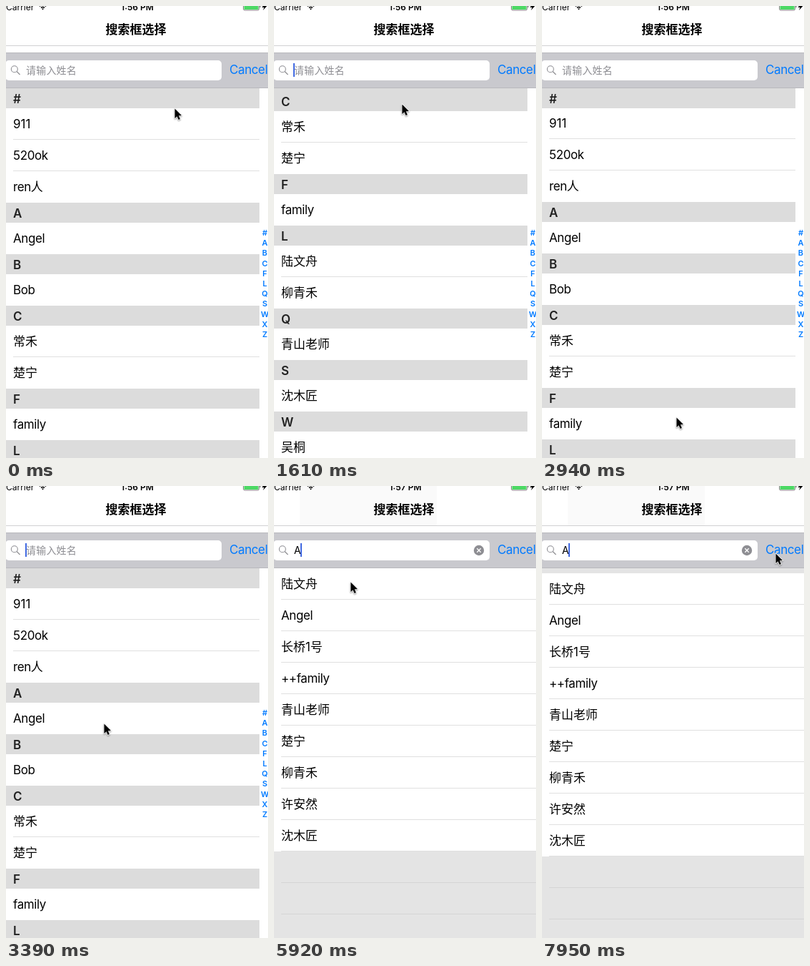
These frames come from a looping animation (367x632 px, 8 s). An HTML page with a canvas:

```html
<!DOCTYPE html>
<html lang="zh">
<head>
<meta charset="utf-8">
<style>
html, body { margin: 0; width: 100%; height: 100%; overflow: hidden; background: #fff; }
canvas { display: block; width: 367px; height: 632px; }
</style>
</head>
<body>
<canvas id="stage"></canvas>
<script>
const W = 367, H = 632, LOOP = 8000, TOP = 115, ROW = 44, HEAD = 28;
const FONT = 'Inter, "Noto Sans CJK SC", "Noto Sans CJK", sans-serif';
const BLUE = '#007aff', GRAY = '#8e8e93';
const canvas = document.getElementById('stage');
const dpr = window.devicePixelRatio || 1;
canvas.width = W * dpr;
canvas.height = H * dpr;
const c = canvas.getContext('2d');

const sections = [
  ['#', '911', '520ok', 'ren人'], ['A', 'Angel'], ['B', 'Bob'],
  ['C', '常禾', '楚宁'], ['F', 'family'], ['L', '陆文舟', '柳青禾'],
  ['Q', '青山老师'], ['S', '沈木匠'], ['W', '吴桐'],
  ['X', '小叔', '许安然'], ['Z', '长桥1号', '中english9%']
];
const results = ['陆文舟', 'Angel', '长桥1号', '++family', '青山老师',
  '楚宁', '柳青禾', '许安然', '沈木匠'];

// Redraw bursts: start, end, number of steps.
const bursts = [[0, 0, 1], [140, 290, 2], [580, 1610, 8], [1760, 2790, 8],
  [2940, 3840, 7], [4440, 4440, 1], [4890, 5920, 8], [6070, 7080, 8], [7230, 7950, 6]];
const ticks = bursts.flatMap(([a, b, n]) => Array.from({ length: n },
  (_, i) => Math.floor((a + (b - a) * i / Math.max(1, n - 1)) / 10) * 10));

const pointerPath = [[0, 236, 143], [140, 238, 150], [290, 237, 156], [580, 215, 330],
  [880, 195, 438], [1020, 193, 438], [1610, 179, 137], [1900, 160, 215], [2050, 160, 230],
  [2200, 162, 253], [2500, 172, 555], [2790, 184, 577], [2940, 188, 575], [3840, 85, 88],
  [4740, 85, 88], [5330, 298, 92], [5480, 290, 92], [5920, 107, 134], [6200, 120, 300],
  [6500, 150, 400], [6900, 160, 250], [7230, 170, 200], [7500, 200, 370], [7950, 327, 94]];
const listPath = [[0, 0], [1020, 0], [1610, 300], [1900, 545], [2050, 544], [2200, 521],
  [2500, 215], [2790, 12], [2940, 1], [3090, 0]];
const resultPath = [[6450, 0], [6850, 75], [7080, 4], [7230, 0], [7510, -84], [7800, -24], [7950, -7]];

function track(path, t) {
  if (t <= path[0][0]) return path[0].slice(1);
  const i = path.findIndex(p => p[0] > t);
  if (i < 0) return path[path.length - 1].slice(1);
  const a = path[i - 1], b = path[i];
  const k = (t - a[0]) / (b[0] - a[0]);
  return a.slice(1).map((v, j) => v + (b[j + 1] - v) * k);
}

function box(x, y, w, h, color) {
  c.fillStyle = color;
  c.fillRect(x, y, w, h);
}

function text(str, x, y, { size = 17, weight = 400, color = '#000', align = 'left', spacing } = {}) {
  c.font = `${weight} ${size}px ${FONT}`;
  c.letterSpacing = (spacing ?? (/[a-z]/i.test(str) ? -0.4 : 0)) + 'px';
  c.textAlign = align;
  c.fillStyle = color;
  c.fillText(str, x, y);
}

function shape(points, fill, stroke, width = 1) {
  c.beginPath();
  points.forEach(([x, y]) => c.lineTo(x, y));
  c.closePath();
  if (stroke) {
    c.strokeStyle = stroke;
    c.lineWidth = width;
    c.stroke();
  }
  c.fillStyle = fill;
  c.fill();
}

function line(x1, y1, x2, y2, color, width) {
  c.strokeStyle = color;
  c.lineWidth = width;
  c.beginPath();
  c.moveTo(x1, y1);
  c.lineTo(x2, y2);
  c.stroke();
}

function sectionHead(name, y) {
  box(0, y, 355, HEAD, '#dcdcdc');
  text(name, 10, y + 20.5, { weight: 600, color: '#222' });
}

function drawSections(scroll) {
  box(0, TOP, W, H - TOP, '#fff');
  let y = TOP - scroll;
  for (const [name, ...rows] of sections) {
    const start = y, end = y + HEAD + rows.length * ROW;
    rows.forEach((row, i) => {
      const top = start + HEAD + i * ROW;
      text(row, 10, top + 28);
      if (i < rows.length - 1) box(10, top + 43, 345, 1, '#e0e0e0');
    });
    sectionHead(name, Math.min(Math.max(start, TOP), end - HEAD));
    y = end;
  }
  box(355, TOP, 12, H - TOP, '#fff');
  sections.forEach(([name], i) => text(name, 362.5, 321 + i * 14.2,
    { size: 11, weight: 600, color: BLUE, align: 'center', spacing: 0 }));
}

function drawResults(scroll) {
  box(0, TOP, W, H - TOP, '#e4e4e4');
  const top = TOP - scroll;
  box(0, top, W, results.length * ROW, '#fff');
  for (let i = 0; i < 15; i++) {
    const y = top + i * ROW;
    if (results[i]) text(results[i], 10, y + 28);
    box(10, y + 43, W - 10, 1, i < results.length ? '#e0e0e0' : '#d5d5d5');
  }
}

function drawStatus(late) {
  box(0, 0, W, 66, '#fff');
  if (late) box(36, 0, 192, 55, '#fafafa');
  text('Carrier', 0, 5.5, { size: 12, spacing: 0 });
  text(late ? '1:57 PM' : '1:56 PM', 184, 5.5, { size: 12, weight: 600, align: 'center', spacing: 0 });
  c.strokeStyle = '#000';
  c.lineWidth = 1.6;
  for (const r of [3.5, 6.5]) {
    c.beginPath();
    c.arc(51.5, 5, r, -Math.PI * 0.75, -Math.PI * 0.25);
    c.stroke();
  }
  shape([[51.5, 5.5], [49.8, 3.6], [53.2, 3.6]], '#000');
  c.strokeStyle = '#555';
  c.lineWidth = 0.7;
  c.beginPath();
  c.roundRect(332.5, -4, 22, 10, 2);
  c.stroke();
  box(333.5, -3, 20, 8, '#4cd964');
  box(355.5, -1, 1, 3, '#555');
  shape([[363, -4], [358.5, 2], [361.5, 2], [360, 6], [365.5, 0], [362.5, 0]], '#000');
  text('搜索框选择', 182, 39, { weight: 600, align: 'center' });
  box(0, 55, W, 1, '#d0d0d2');
}

function drawSearch(typed, caret) {
  box(0, 65, W, 50, '#c9c9ce');
  box(0, 65, W, 1, '#b8b8bd');
  box(0, 114, W, 1, '#b8b8bd');
  c.fillStyle = '#fff';
  c.beginPath();
  c.roundRect(-1, 76, 303, 28, 5);
  c.fill();
  c.strokeStyle = GRAY;
  c.lineWidth = 1.1;
  c.beginPath();
  c.arc(11.8, 88.3, 4.5, 0, Math.PI * 2);
  c.stroke();
  line(15, 91.5, 19.5, 96, GRAY, 1.3);
  if (typed) {
    text('A', 28, 95, { size: 14, spacing: 0 });
    c.fillStyle = GRAY;
    c.beginPath();
    c.arc(287, 90, 7.2, 0, Math.PI * 2);
    c.fill();
    line(284.3, 87.3, 289.7, 92.7, '#fff', 1.3);
    line(289.7, 87.3, 284.3, 92.7, '#fff', 1.3);
  } else {
    text('请输入姓名', 28, 95, { size: 14, color: GRAY, spacing: 0.2 });
  }
  if (caret) box(typed ? 37 : 27, 80, 2, 19, '#4169e1');
  text('Cancel', 313, 95, { color: BLUE });
}

function drawPointer(x, y) {
  const arrow = [[0, 0], [0, 13.5], [3.1, 10.7], [5.2, 15.6], [7.4, 14.6], [5.3, 9.8], [9.5, 9.6]];
  c.save();
  c.translate(x + 0.5, y + 0.5);
  c.lineJoin = 'round';
  c.shadowColor = 'rgba(0,0,0,.3)';
  c.shadowBlur = 2 * dpr;
  c.shadowOffsetY = dpr;
  shape(arrow, '#fff', '#fff', 2);
  c.shadowColor = 'transparent';
  shape(arrow, '#000');
  c.restore();
}

function caretOn(t) {
  if (t < 140) return false;
  if (t < 4440) return (t - 140) % 1000 < 500;
  return t < 4890 || (t - 3460) % 1000 < 500;
}

function draw(time) {
  const t = ticks.filter(k => k <= time).pop();
  const typed = t >= 4440;
  c.setTransform(dpr, 0, 0, dpr, 0, 0);
  if (typed) drawResults(Math.round(track(resultPath, t)[0]));
  else drawSections(Math.round(track(listPath, t)[0]));
  drawStatus(t >= 5030);
  drawSearch(typed, caretOn(t));
  drawPointer(...track(pointerPath, t).map(Math.round));
}

function loop() {
  draw(performance.now() % LOOP);
  requestAnimationFrame(loop);
}
loop();
</script>
</body>
</html>
```
